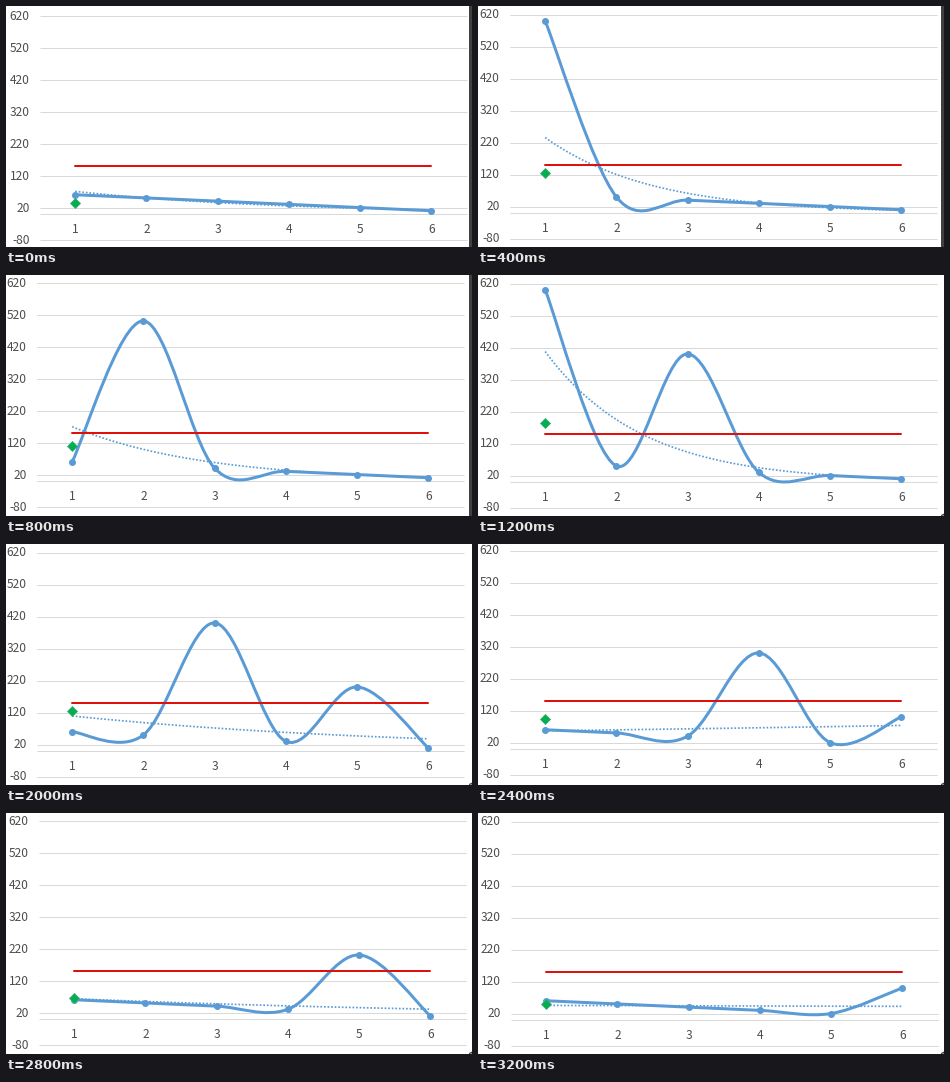
A matplotlib script that plays this animation: 466 by 241 pixels, repeating every 3.6 s.

```python
import numpy as np
import matplotlib.pyplot as plt
from matplotlib.animation import FuncAnimation
from matplotlib.patches import PathPatch, Polygon, Rectangle
from matplotlib.path import Path

W, H, DPI = 466, 241, 100
PX = 72 / DPI
BLUE, RED, GREEN = "#5B9BD5", "#E0100B", "#00B050"
GRID, INK, DARK = "#D9D9D9", "#4D4D4D", "#404040"
FONT = "Noto Sans CJK JP"
FRAMES, STEP, SCALE, LIMIT = 9, 71.2, 0.32, 150
DAYS = np.arange(1, 7)

# small jumps of the whole chart, in pixels left and up
LEFT = [0, 2, 3, 2, 2, 3, 2, 1, 1]
UP = [0, 1, 2, 1, 2, 1, 3, 2, 1]

fig = plt.figure(figsize=(W / DPI, H / DPI), dpi=DPI, facecolor="white")
ax = fig.add_axes([0, 0, 1, 1])


def series(i):
    """Falling line with two peaks, two days apart, moving a day per step."""
    peak = (DAYS == i) | (DAYS == i - 2)
    return np.where(peak, 700 - 100 * DAYS, 70 - 10 * DAYS)


def smooth(points):
    """Bezier path whose handles are a sixth of the neighbouring chord."""
    ends = np.vstack([points[:1], points, points[-1:]])
    handle = (ends[2:] - ends[:-2]) / 6
    verts = [points[0]]
    for k in range(len(points) - 1):
        verts += [points[k] + handle[k], points[k + 1] - handle[k + 1], points[k + 1]]
    return Path(verts, [Path.MOVETO] + [Path.CURVE4] * (len(verts) - 1))


def label(x, y, text, align):
    ax.text(x, y, text, ha=align, va="baseline", color=INK,
            family=FONT, fontsize=12 * PX)


def draw(i):
    values = series(i)

    def px(day):
        return 69.2 - LEFT[i] + (day - 1) * STEP

    def py(value):
        return 9.55 - UP[i] + (620 - value) * SCALE

    ax.clear()
    ax.set(xlim=(0, W), ylim=(H, 0))
    ax.axis("off")

    for v in [*range(-80, 621, 100), 0]:
        y = np.floor(py(v)) + 0.5
        ax.plot([px(0.5), px(6.5)], [y, y], color=GRID, lw=PX,
                solid_capstyle="butt", zorder=1)
        if v:
            label(23.5 - LEFT[i], y + 4, str(v), "right")
    for d in DAYS:
        label(px(d), 227 - UP[i], str(d), "center")

    points = np.column_stack([px(DAYS), py(values)])
    ax.add_patch(PathPatch(smooth(points), fc="none", ec=BLUE, lw=3 * PX,
                           capstyle="round", joinstyle="round", zorder=3))
    ax.plot(*points.T, "o", color=BLUE, ms=7 * PX, mew=0, zorder=4)

    # exponential trend
    slope, start = np.polyfit(DAYS, np.log(values), 1)
    t = np.linspace(1, 6, 120)
    ax.plot(px(t), py(np.exp(start + slope * t)), color=BLUE, lw=1.7 * PX,
            ls=(0, (1, 1.1)), dash_capstyle="butt", zorder=4)

    ax.plot(px(DAYS[[0, -1]]), [py(LIMIT)] * 2, color=RED, lw=2 * PX,
            solid_capstyle="round", zorder=5)
    ax.plot(px(1), py(values.mean()), "D", color=GREEN, ms=7.6 * PX,
            mec="#3FAA70", mew=0.8 * PX, zorder=6)

    if i < 3:
        ax.add_patch(Rectangle((W - 3, 0), 3, H, fc=DARK, lw=0))
    else:
        ax.add_patch(Polygon([(W - 3, H), (W - 3, 240), (W, 238.5), (W, H - 0.5)],
                             fc=DARK, lw=0))
    return []


anim = FuncAnimation(fig, draw, frames=FRAMES, init_func=lambda: [],
                     interval=400, repeat=True, repeat_delay=0)
plt.show()
```
